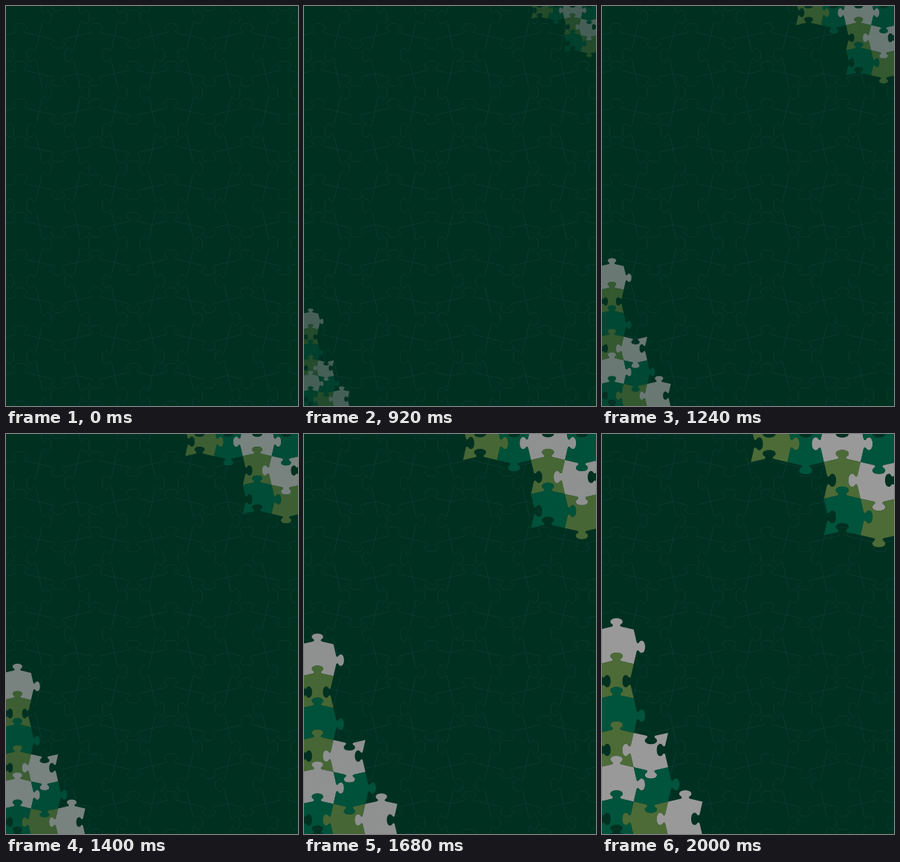
Recreate the animation shown at these times as an HTML page with a canvas. Size 393 by 538 pixels, loop 5000 ms.

```html
<!DOCTYPE html>
<html lang="en">
<head>
<meta charset="utf-8">
<title>Puzzle corners</title>
<style>
  html, body { margin: 0; width: 100%; height: 100%; overflow: hidden; background: #003020; }
  canvas { display: block; }
</style>
</head>
<body>
<canvas width="393" height="538"></canvas>
<script>
const W = 393, H = 538, LOOP = 5000, STEP = 40;
const ctx = document.querySelector('canvas').getContext('2d');
const COLORS = { W: '#999999', T: '#00543c', O: '#4d6b37' };

// Adds one jigsaw edge; side +1 puts the knob left of the travel direction, -1 right of it.
function addEdge(path, [x0, y0], [x1, y1], side) {
  const dx = x1 - x0, dy = y1 - y0;
  const at = (t, h) => [x0 + dx * t + dy * h * side, y0 + dy * t - dx * h * side];
  const curve = (...pts) => path.bezierCurveTo(...pts.flatMap(p => at(...p)));
  path.lineTo(...at(.35, .08));
  curve([.42, .095], [.40, .14], [.36, .165]);
  curve([.29, .21], [.31, .33], [.5, .33]);
  curve([.69, .33], [.71, .21], [.64, .165]);
  curve([.60, .14], [.58, .095], [.65, .08]);
  path.lineTo(x1, y1);
}

const sign = flag => flag ? 1 : -1;
const mod4 = n => ((n % 4) + 4) % 4;

// up(col, line) and right(line, row) tell which way each knob points.
const board = {
  x: -6.2, y: -10.5, pitch: 50.78,
  up: (c, r) => mod4(r) === 2 ? mod4(c) % 3 === 0 : c % 2 === 0,
  right: (c, r) => (r % 2 === 0) !== (c % 4 === 0)
};
const bottomLeft = {
  x: -3.6, y: 263, pitch: 46.3, origin: [0, H],
  rows: ['W', 'O', 'T', 'OW', 'WT', 'TOW'],
  up: (c, r) => c === 0 || (c === 2 && r === 5),
  right: board.right
};
const topRight = {
  x: 200.4, y: -11.5, pitch: 49.2, origin: [W, 0],
  rows: ['OTWT', '  OW', '  TO'],
  up: (c, r) => c % 2 === 0 && r > 0,
  right: (c, r) => c === 2 ? r > 0 : r % 2 === 0
};

const corner = (grid, c, r) => [grid.x + c * grid.pitch, grid.y + r * grid.pitch];

function boardLines() {
  const path = new Path2D();
  for (let r = -1; r <= 11; r++) {
    for (let c = -1; c <= 8; c++) {
      const start = corner(board, c, r);
      path.moveTo(...start);
      addEdge(path, start, corner(board, c + 1, r), sign(board.up(c, r)));
      path.moveTo(...start);
      addEdge(path, start, corner(board, c, r + 1), sign(board.right(c, r)));
    }
  }
  return path;
}

function piece(grid, c, r) {
  const path = new Path2D();
  const tl = corner(grid, c, r), tr = corner(grid, c + 1, r);
  const br = corner(grid, c + 1, r + 1), bl = corner(grid, c, r + 1);
  path.moveTo(...tl);
  addEdge(path, tl, tr, sign(grid.up(c, r)));
  addEdge(path, tr, br, sign(grid.right(c + 1, r)));
  addEdge(path, br, bl, -sign(grid.up(c, r + 1)));
  addEdge(path, bl, tl, -sign(grid.right(c, r)));
  path.closePath();
  return path;
}

function groupPieces(grid) {
  return grid.rows.flatMap((row, r) => [...row].flatMap((key, c) =>
    key === ' ' ? [] : [{ path: piece(grid, c, r), color: COLORS[key] }]));
}

const lines = boardLines();
const groups = [bottomLeft, topRight].map(grid => ({ origin: grid.origin, pieces: groupPieces(grid) }));

// Sine ease in and out; the corners show from 280 ms and rest from 2000 ms.
function growth(t) {
  if (t < 280) return 0;
  if (t >= 2000) return 1;
  return (1 - Math.cos(Math.PI * (t + 75) / 2120)) / 2;
}

function draw(t) {
  ctx.globalAlpha = 1;
  ctx.fillStyle = '#003020';
  ctx.fillRect(0, 0, W, H);
  ctx.strokeStyle = '#123f38';
  ctx.lineWidth = .7;
  ctx.stroke(lines);

  const size = growth(t);
  if (!size) return;
  ctx.globalAlpha = size;
  for (const { origin: [ox, oy], pieces } of groups) {
    ctx.save();
    ctx.translate(ox, oy);
    ctx.scale(size, size);
    ctx.translate(-ox, -oy);
    for (const { path, color } of pieces) {
      ctx.fillStyle = color;
      ctx.fill(path);
    }
    ctx.restore();
  }
}

const startTime = performance.now();
function tick() {
  const t = (performance.now() - startTime) % LOOP;
  draw(Math.floor(t / STEP) * STEP);
  requestAnimationFrame(tick);
}
tick();
</script>
</body>
</html>
```
